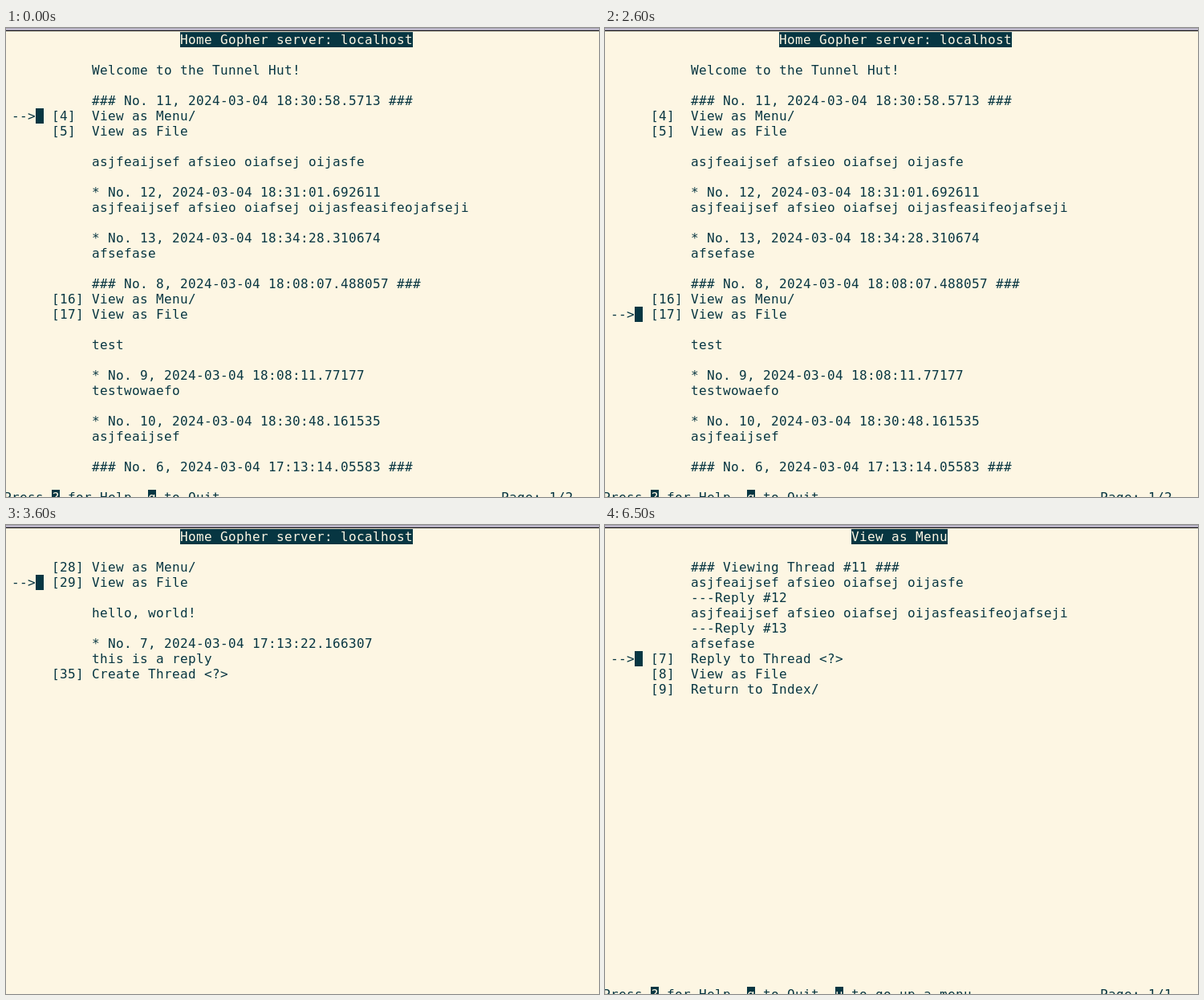
These frames come from a looping animation (739 by 584 pixels, 8 s). An HTML page:

```html
<!DOCTYPE html>
<html lang="en">
<head>
<meta charset="utf-8">
<title>Terminal menu</title>
<style>
  :root { --paper: #fdf6e3; --ink: #073642; }
  html, body {
    margin: 0;
    width: 100%;
    height: 100%;
    overflow: hidden;
    background: var(--paper);
  }
  #stage {
    position: relative;
    width: 739px;
    height: 584px;
    overflow: hidden;
    background: var(--paper);
    color: var(--ink);
  }
  #edge {
    position: absolute;
    width: 100%;
    height: 3px;
    background: #b5b0c1;
    border-bottom: 1px solid #000;
  }
  /* Character grid: 10 x 19 px cells, first cell at (-3, 5) */
  pre {
    position: absolute;
    left: -3px;
    top: 5px;
    margin: 0;
    font: 16px/19px "DejaVu Sans Mono", monospace;
    letter-spacing: calc(10px - 1ch);
    font-variant-ligatures: none;
    animation: 8s step-end infinite;
  }
  b {
    display: inline-block;
    height: 19px;
    vertical-align: top;
    font-weight: normal;
    background: var(--ink);
    color: var(--paper);
  }
  #index { animation-name: index; }
  #more { animation-name: more; }
  #thread { animation-name: thread; }
  #pointer { animation-name: pointer; }

  @keyframes index {
    0%, 52.5% { opacity: 1; }
    37.5%, 81.25%, 100% { opacity: 0; }
  }
  @keyframes more {
    0%, 52.5%, 100% { opacity: 0; }
    37.5% { opacity: 1; }
  }
  @keyframes thread {
    0% { opacity: 0; }
    81.25%, 100% { opacity: 1; }
  }
  @keyframes pointer {
    0%, 18.75%, 52.5% { transform: translateY(95px); }
    11.25%, 26.25% { transform: translateY(114px); }
    28.75% { transform: translateY(323px); }
    32.5% { transform: translateY(342px); }
    37.5% { transform: translateY(38px); }
    45% { transform: translateY(57px); }
    48.75% { transform: translateY(171px); }
    81.25%, 100% { transform: translateY(152px); }
  }
</style>
</head>
<body>
<div id="stage">
<div id="edge"></div>
<pre id="index">                      <b>Home Gopher server: localhost</b>

           Welcome to the Tunnel Hut!

           ### No. 11, 2024-03-04 18:30:58.5713 ###
      [4]  View as Menu/
      [5]  View as File

           asjfeaijsef afsieo oiafsej oijasfe

           * No. 12, 2024-03-04 18:31:01.692611
           asjfeaijsef afsieo oiafsej oijasfeasifeojafseji

           * No. 13, 2024-03-04 18:34:28.310674
           afsefase

           ### No. 8, 2024-03-04 18:08:07.488057 ###
      [16] View as Menu/
      [17] View as File

           test

           * No. 9, 2024-03-04 18:08:11.77177
           testwowaefo

           * No. 10, 2024-03-04 18:30:48.161535
           asjfeaijsef

           ### No. 6, 2024-03-04 17:13:14.05583 ###

Press <b>?</b> for Help, <b>q</b> to Quit                                   Page: 1/2</pre>
<pre id="more">                      <b>Home Gopher server: localhost</b>

      [28] View as Menu/
      [29] View as File

           hello, world!

           * No. 7, 2024-03-04 17:13:22.166307
           this is a reply
      [35] Create Thread &lt;?&gt;





















Press <b>?</b> for Help, <b>q</b> to Quit                                   Page: 2/2</pre>
<pre id="thread">                               <b>View as Menu</b>

           ### Viewing Thread #11 ###
           asjfeaijsef afsieo oiafsej oijasfe
           ---Reply #12
           asjfeaijsef afsieo oiafsej oijasfeasifeojafseji
           ---Reply #13
           afsefase
      [7]  Reply to Thread &lt;?&gt;
      [8]  View as File
      [9]  Return to Index/



















Press <b>?</b> for Help, <b>q</b> to Quit, <b>u</b> to go up a menu                Page: 1/1</pre>
<pre id="pointer"> --&gt;<b> </b></pre>
</div>
</body>
</html>
```
